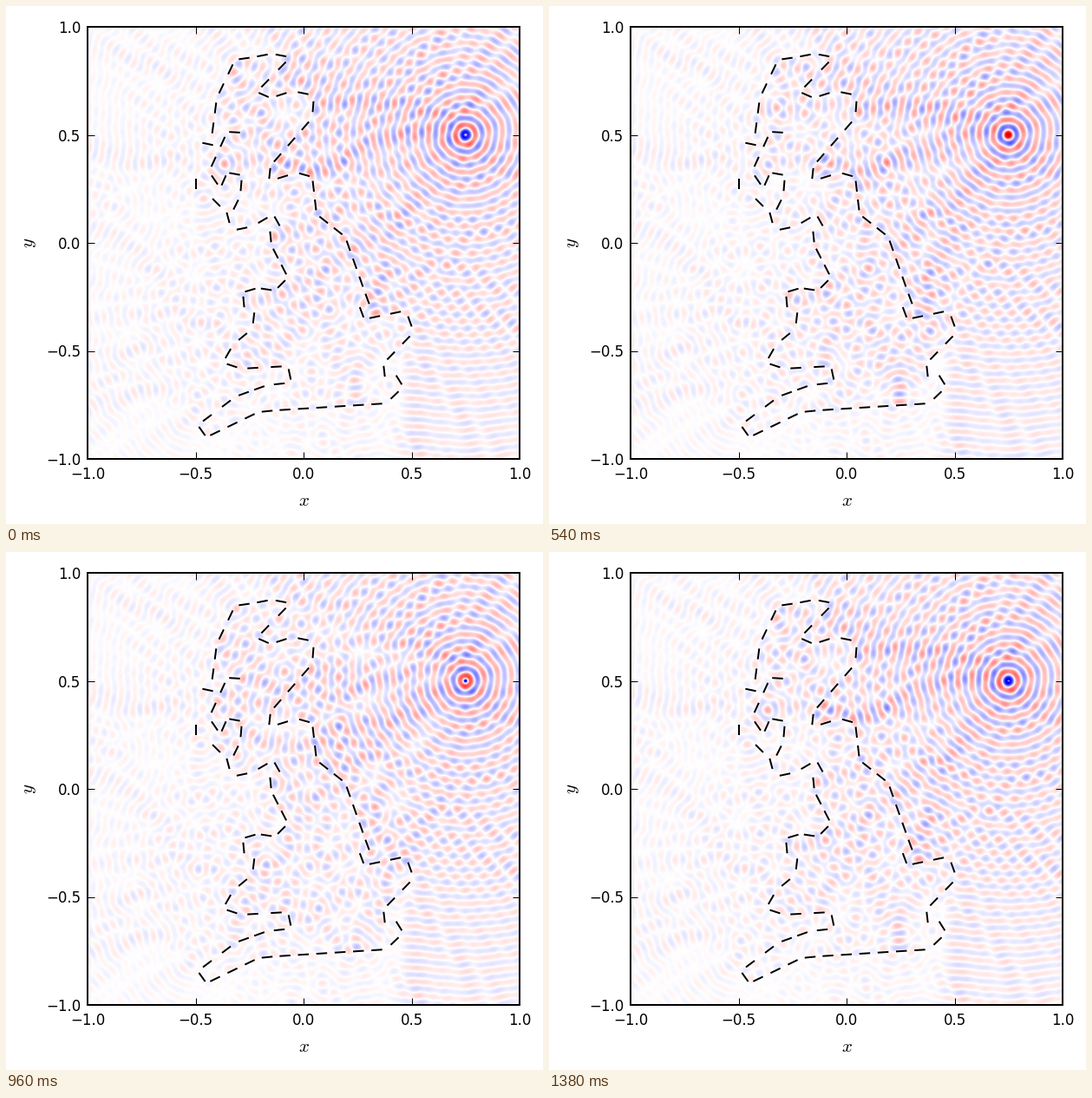
Animation of 619 by 597 pixels, one loop 1.44 s. Source, as a matplotlib script:

```python
"""Point source leaking through a coastline of short sound-soft screens."""
import numpy as np
import matplotlib.pyplot as plt
from matplotlib.animation import FuncAnimation
from matplotlib.collections import LineCollection

W, H, DPI = 619, 597, 128
PX = 72 / DPI                      # one pixel in points
LEFT, TOP, SIDE = 94, 24, 498      # axes box in pixels
FRAMES, INTERVAL = 24, 60

K = 100.0                          # wavenumber
SOURCE = 0.75 + 0.5j
PHASE = -0.75
VMAX = 0.36
DASH, PERIOD = 12.5, 22            # screen length and spacing in pixels
DR, R_MIN, R_MAX = 1e-4, 0.002, 3.0

# Corners of the coast in stage pixels, clockwise from the north-west.
COAST = [
    (237, 152), (243, 106), (264, 62), (285, 59), (306, 55), (328, 59),
    (289, 99), (305, 106), (330, 98), (355, 103), (353, 129), (305, 184),
    (303, 202), (335, 192), (353, 197), (358, 240), (391, 266), (413, 328),
    (420, 347), (407, 345), (413, 361), (461, 351), (470, 376), (435, 412),
    (437, 430), (448, 423), (458, 439), (438, 458), (311, 466), (291, 468),
    (231, 497), (221, 483), (265, 450), (301, 437), (329, 434), (325, 415),
    (271, 418), (250, 411), (262, 390), (284, 372), (287, 347), (275, 352),
    (273, 330), (290, 325), (310, 328), (325, 313), (306, 276), (304, 256),
    (317, 256), (308, 240), (284, 254), (260, 259), (252, 229), (260, 239),
    (270, 219), (272, 195), (255, 192), (247, 210), (234, 191), (255, 145),
    (272, 146),
]
ISLETS = [[(223, 157), (242, 161)], [(252, 236), (233, 217)],
          [(219, 216), (219, 194)]]


def screens(path):
    """Centre whole dashes on every edge, so that corners stay open."""
    x, y = np.array(path, float).T
    half = SIDE / 2
    z = (x - LEFT - half) / half + 1j * (TOP + half - y) / half
    out = []
    for a, b in zip(z, z[1:]):
        n = int(abs(b - a) * half / PERIOD + 0.4)
        arm = DASH / SIDE * (b - a) / abs(b - a)
        for i in range(n):
            mid = a + (b - a) * (i + 0.5) / n
            out.append((mid - arm, mid + arm))
    return out


def hankel(x):
    """H0 of the first kind, by quadrature along steepest descent."""
    ds = 0.015
    total = np.full(x.shape, 0.5 + 0j)
    for s in np.arange(ds, 6, ds):
        total += np.exp(-s * s) / np.sqrt(1 + 0.5j * s * s / x)
    return np.exp(1j * (x - np.pi / 4)) * np.sqrt(8 / x) / np.pi * ds * total


def solve(dashes, nodes=8, size=501):
    """Total field, with the screen charges chosen to cancel it on each screen."""
    radii = np.maximum(np.arange(0, R_MAX, DR), R_MIN)
    table = (0.25j * hankel(K * radii)).astype(np.complex64)

    def green(dz):
        return table[(np.abs(dz) / DR + 0.5).astype(np.int32)]

    t = (np.arange(nodes) + 0.5) / nodes
    z = np.concatenate([a + (b - a) * t for a, b in dashes])
    step = DASH / (SIDE / 2) / nodes
    matrix = green(z[:, None] - z).astype(complex)
    log = np.log(K * step / 4) + np.euler_gamma - 1
    np.fill_diagonal(matrix, 0.25j * (1 + 2j / np.pi * log))
    charge = np.linalg.solve(matrix, -green(z - SOURCE))

    x = np.linspace(-1, 1, size)
    grid = (x + 1j * x[:, None]).astype(np.complex64)
    field = green(grid - np.complex64(SOURCE))
    for q, p in zip(charge.astype(np.complex64), z.astype(np.complex64)):
        field += q * green(grid - p)
    return field, 1 + 1 / (size - 1)


plt.rcParams.update({"font.family": "DejaVu Sans", "mathtext.fontset": "cm"})
fig = plt.figure(figsize=(W / DPI, H / DPI), dpi=DPI, facecolor="white")
ax = fig.add_axes([LEFT / W, 1 - (TOP + SIDE) / H, SIDE / W, SIDE / H])

dashes = [d for path in [COAST, *ISLETS] for d in screens(path)]
field, edge = solve(dashes)


def wave(i):
    t = 2 * np.pi * i / FRAMES + PHASE
    return (field * np.exp(-1j * t)).real


image = ax.imshow(wave(0), origin="lower", extent=(-edge, edge, -edge, edge),
                  cmap="seismic", vmin=-VMAX, vmax=VMAX,
                  interpolation="bilinear", aspect="auto")
lines = [[(p.real, p.imag) for p in d] for d in dashes]
ax.add_collection(LineCollection(lines, colors="black", linewidths=2 * PX,
                                 capstyle="butt"))

ticks = np.linspace(-1, 1, 5)
ax.set(xlim=(-1, 1), ylim=(-1, 1), xticks=ticks, yticks=ticks)
ax.tick_params(direction="in", top=True, right=True, length=8 * PX,
               width=PX, labelsize=16.6 * PX)
ax.tick_params(axis="x", pad=9 * PX)
ax.tick_params(axis="y", pad=8 * PX)
for spine in ax.spines.values():
    spine.set_linewidth(2 * PX)

label = dict(fontsize=21 * PX, ha="center", va="center")
fig.text(343.5 / W, 1 - 570.5 / H, "$x$", **label)
fig.text(27 / W, 1 - 273 / H, "$y$", rotation=90, **label)


def update(i):
    image.set_data(wave(i))
    return (image,)


anim = FuncAnimation(fig, update, frames=FRAMES, interval=INTERVAL,
                     repeat=True, repeat_delay=0)
plt.show()
```
